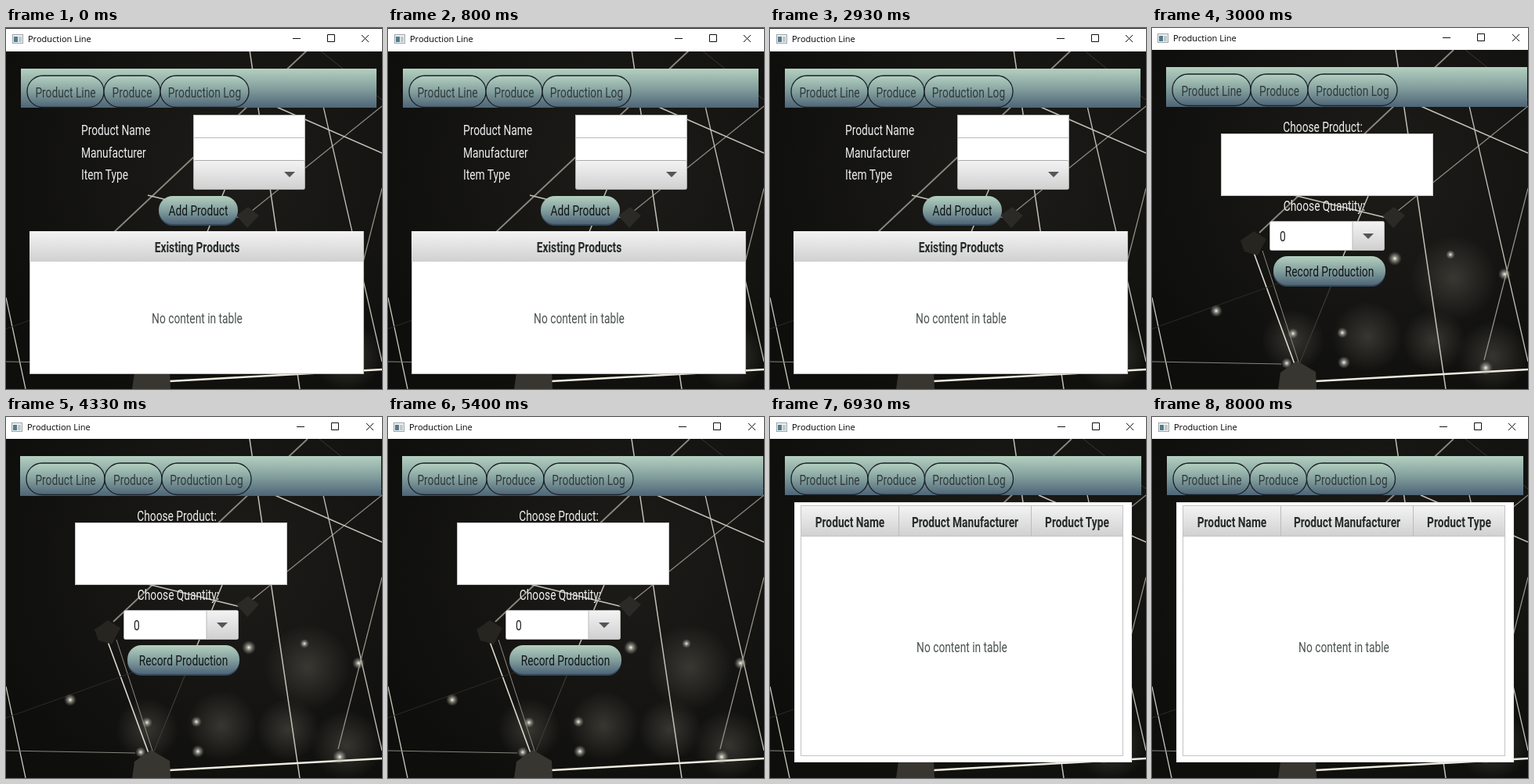
Write an HTML page that moves like this. It is 480x462 px and loops after 8.99 s.

```html
<!DOCTYPE html>
<html lang="en">
<head>
<meta charset="utf-8">
<title>Production Line</title>
<style>
  html, body { margin: 0; height: 100%; overflow: hidden; background: #10100e; }
  svg { display: block; width: 100%; height: 100%; }
  text { font: 19px Roboto, sans-serif; }
  .title { font: 11px "Open Sans", sans-serif; }
  .bold { font-weight: 700; }
  .icon { fill: none; stroke: #111; stroke-width: 1; }
</style>
</head>
<body>
<svg id="stage" viewBox="0 0 480 462">
  <defs>
    <linearGradient id="teal" x2="0" y2="1">
      <stop stop-color="#b4d0c0"/><stop offset=".5" stop-color="#84a09e"/><stop offset="1" stop-color="#4e6577"/>
    </linearGradient>
    <linearGradient id="grey" x2="0" y2="1">
      <stop stop-color="#f3f3f3"/><stop offset="1" stop-color="#d0d0d0"/>
    </linearGradient>
    <radialGradient id="night" cx=".62" cy=".4" r=".7">
      <stop stop-color="#1d1c19"/><stop offset="1" stop-color="#0e0e0c"/>
    </radialGradient>
    <radialGradient id="glow">
      <stop stop-color="#fffdf0"/><stop offset=".3" stop-color="#c8c5b8" stop-opacity=".7"/><stop offset="1" stop-color="#888" stop-opacity="0"/>
    </radialGradient>
    <radialGradient id="haze">
      <stop stop-color="#5c5a52" stop-opacity=".5"/><stop offset="1" stop-color="#5c5a52" stop-opacity="0"/>
    </radialGradient>
  </defs>
</svg>
<script>
const LOOP = 8990;
const STARTS = [0, 3000, 6000];
const CONDENSED = 0.725; // one narrow face for all form text

const box = (x, y, w, h, fill, more = '') =>
  `<rect x="${x}" y="${y}" width="${w}" height="${h}" fill="${fill}" ${more}/>`;
const frame = (x, y, w, h, fill, stroke = '#bbb') =>
  box(x + .5, y + .5, w - 1, h - 1, fill, `stroke="${stroke}"`);
const line = (x1, y1, x2, y2, color, width = 1) =>
  `<path d="M${x1} ${y1}L${x2} ${y2}" stroke="${color}" stroke-width="${width}"/>`;
const shape = (points, fill) => `<polygon points="${points}" fill="${fill}"/>`;
const disc = (x, y, r, fill) => `<circle cx="${x}" cy="${y}" r="${r}" fill="url(#${fill})"/>`;
const label = (x, y, text, fill, anchor = 'middle', style = '') =>
  `<text transform="translate(${x} ${y}) scale(${CONDENSED} 1)" fill="${fill}" text-anchor="${anchor}" class="${style}">${text}</text>`;
const heading = (x, y, text) => label(x, y, text, '#262a2a', 'middle', 'bold');
const arrow = (x, y) => shape(`${x - 7},${y} ${x + 7},${y} ${x},${y + 7}`, '#555');

function backdrop() {
  const threads = [
    [0, 345, 25, 462, '#c9c7be', 1.3], [0, 427, 165, 430, '#86847b', 1.2],
    [129, 285, 182, 430, '#dddacf', 1.6], [141, 285, 188, 430, '#8d8b81', 1],
    [137, 262, 385, 28, '#8a877d', 1.8], [181, 214, 300, 243, '#c4c1b6', 1.8],
    [314, 234, 480, 100, '#8f8c83', 1.2], [311, 28, 375, 462, '#c4c1b6', 1.5],
    [405, 100, 480, 427, '#c0bdb3', 1.3], [480, 205, 424, 425, '#98958b', 1.2],
    [343, 100, 480, 160, '#c4c1b6', 1.5], [283, 198, 244, 292, '#c4c1b6', 1.5],
    [244, 292, 188, 430, '#3b3a34', 1.2], [209, 452, 480, 437, '#efecdf', 2.6],
    [0, 385, 200, 313, '#2c2b27', 1], [400, 28, 480, 92, '#3a3833', 1]
  ];
  const hazes = [[275, 395, 45], [360, 400, 40], [385, 320, 55], [180, 400, 40], [435, 420, 45]];
  const sparks = [
    [310, 295, 9], [381, 290, 6], [82, 362, 8], [180, 391, 7], [243, 390, 7],
    [245, 428, 8], [426, 435, 9], [450, 315, 8], [172, 429, 7]
  ];
  return box(0, 0, 480, 462, 'url(#night)') +
    hazes.map(h => disc(...h, 'haze')).join('') +
    threads.map(t => line(...t)).join('') +
    sparks.map(s => disc(...s, 'glow')).join('') +
    shape('161,462 164,441 185,426 209,440 210,462', '#383630') +
    shape('113,272 130,260 146,270 135,291 118,286', '#26251f') +
    shape('294,240 309,229 323,240 308,256', '#2b2a26');
}

// White caption strip with its three window buttons
function titleBar(height, x, min, max, close) {
  const mid = height / 2 - 1;
  return box(0, 0, 480, height, '#fff') +
    frame(x, mid - 6, 14, 12, '#eef1f2', '#9ba5aa') +
    box(x + 2, mid - 3, 5, 7, '#547c8b') + box(x + 8, mid - 3, 4, 7, '#bfc9cc') +
    `<text class="title" x="${x + 20}" y="${mid + 4}">Production Line</text>` +
    `<path class="icon" d="M${min} ${mid - .5}h10M${max + .5} ${mid - 5.5}h9v9h-9zM${close} ${mid - 5}l9 9m0-9l-9 9"/>`;
}

function menu(x, y, w, h, tabs) {
  const names = ['Product Line', 'Produce', 'Production Log'];
  return box(x, y, w, h, 'url(#teal)') + names.map((name, i) => {
    const left = tabs[i], right = tabs[i + 1];
    return box(left, y + 9, right - left, 40.5, 'url(#teal)', 'rx="20" stroke="#182127" stroke-width="1.3"') +
      label((left + right) / 2, y + 37, name, '#303a3c');
  }).join('');
}

function button(x, y, w, h, text) {
  return box(x, y + 2, w, h, '#34495c', 'rx="18"') +
    box(x, y, w, h, 'url(#teal)', 'rx="18"') +
    label(x + w / 2, y + h / 2 + 7, text, '#101516');
}

const productLine = () =>
  titleBar(30, 8, 366, 410, 454) + box(0, 0, 480, 1, '#222') +
  menu(19, 52, 454, 50, [27, 125, 197, 310]) +
  ['Product Name', 'Manufacturer', 'Item Type'].map((name, i) =>
    label(96, 137 + 28.5 * i, name, '#eee', 'start')).join('') +
  frame(239, 111, 143, 31, '#fff') + frame(239, 140, 143, 31, '#fff') +
  box(239.5, 169.5, 142, 37, 'url(#grey)', 'stroke="#aaa" rx="2"') + arrow(362, 184) +
  button(195, 215, 101, 36, 'Add Product') +
  frame(30, 260, 427, 183, '#fff') + box(30, 260, 426, 39, 'url(#grey)') +
  heading(244, 287, 'Existing Products') +
  label(244, 378, 'No content in table', '#4a524f');

const produce = () =>
  titleBar(28, 7, 371, 415, 460) +
  menu(18, 50, 461, 51, [26, 126, 199, 313]) +
  label(218, 133, 'Choose Product:', '#eee') +
  frame(88, 135, 271, 80, '#fff', '#c8c8c8') +
  label(220, 234, 'Choose Quantity:', '#eee') +
  box(150.5, 247.5, 146, 37, '#fff', 'stroke="#b4b4b4" rx="2"') +
  box(256, 248, 40, 36, 'url(#grey)') + line(256, 248, 256, 284, '#bbb') +
  label(163, 273, '0', '#222', 'start') + arrow(276, 263) +
  button(155, 292, 143, 37, 'Record Production');

const productionLog = () =>
  titleBar(28, 8, 367, 411, 455) +
  menu(19, 50, 455, 50, [27, 125, 197.5, 310.5]) +
  frame(31, 109, 431, 333, '#fff', '#e4e4e4') +
  frame(39, 113, 412, 321, '#fff', '#c4c4c4') +
  box(40, 114, 410, 39, 'url(#grey)') +
  [164.5, 333.5].map(x => line(x, 114, x, 153, '#bcbcbc')).join('') + line(40, 152.5, 450, 152.5, '#c4c4c4') +
  heading(102, 141, 'Product Name') + heading(249, 141, 'Product Manufacturer') +
  heading(392, 141, 'Product Type') +
  label(245, 301, 'No content in table', '#4a524f');

const pages = [productLine, produce, productionLog];
document.getElementById('stage').insertAdjacentHTML('beforeend',
  backdrop() + pages.map(page => `<g class="page" visibility="hidden">${page()}</g>`).join(''));
const groups = document.querySelectorAll('.page');

function render() {
  const time = performance.now() % LOOP;
  const current = STARTS.filter(start => start <= time).length - 1;
  groups.forEach((group, i) => group.setAttribute('visibility', i === current ? 'visible' : 'hidden'));
  requestAnimationFrame(render);
}
render();
</script>
</body>
</html>
```
